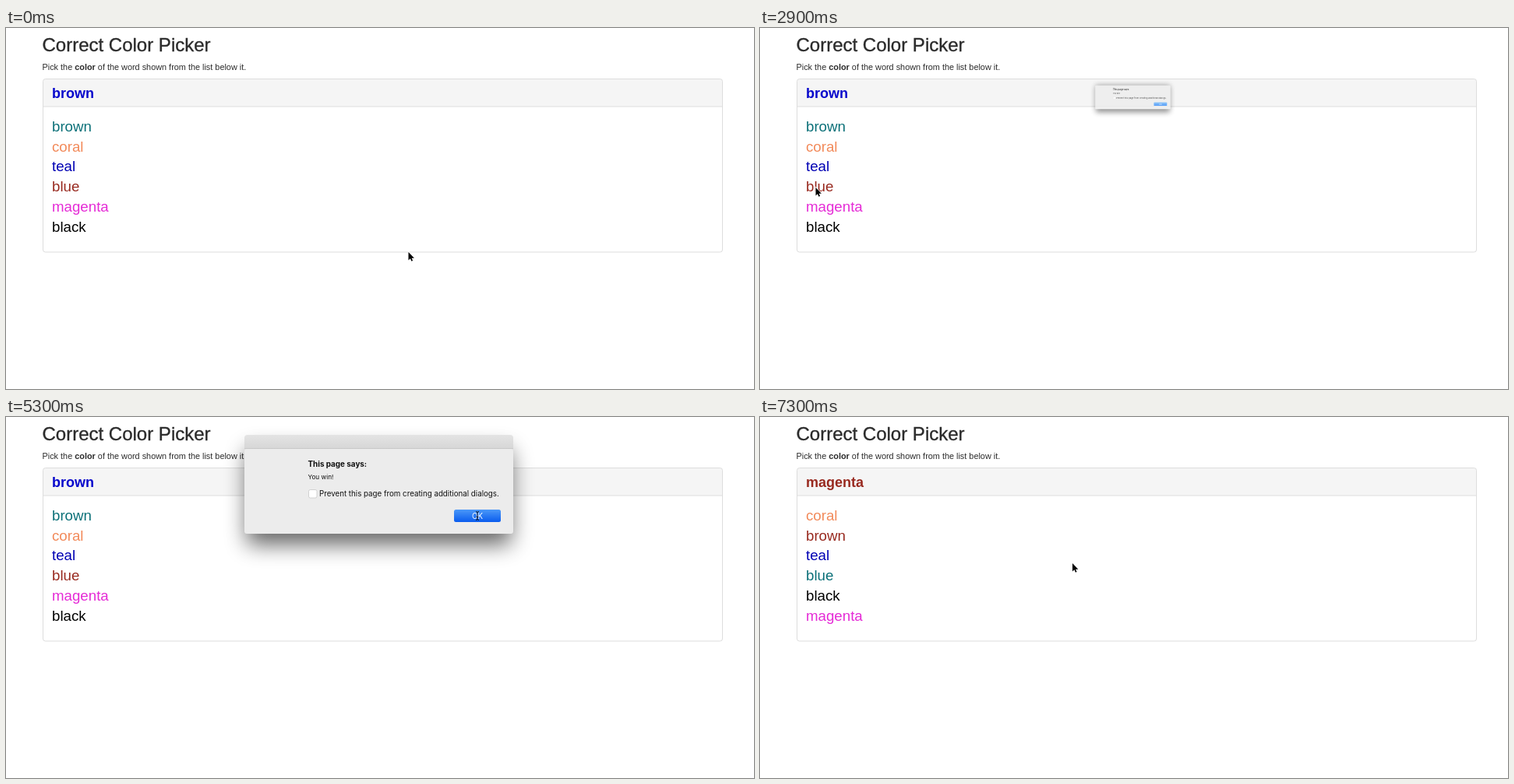
Recreate the animation shown at these times as an HTML page. Size 960 px wide and 464 px high, loop 7400 ms.

```html
<!DOCTYPE html>
<html lang="en">
<head>
<meta charset="utf-8">
<title>Correct Color Picker</title>
<style>
  html, body { margin: 0; width: 100%; height: 100%; overflow: hidden; background: #fff; }
  svg { display: block; width: 960px; height: 464px; font-family: "Liberation Sans", Arial, sans-serif; }
  .title { font-size: 24px; fill: #2b2b2b; stroke: #2b2b2b; stroke-width: .35px; }
  .hint { font-size: 10.88px; fill: #2b2b2b; }
  #word { font-size: 18px; font-weight: bold; }
  #list { font-size: 18.7px; }
  #dialog { font-family: Inter, sans-serif; font-size: 9.74px; fill: #111; }
</style>
</head>
<body>
<svg viewBox="0 0 960 464">
  <defs>
    <linearGradient id="bar" x2="0" y2="1"><stop stop-color="#e4e4e4"/><stop offset="1" stop-color="#d6d6d6"/></linearGradient>
    <linearGradient id="ready" x2="0" y2="1"><stop stop-color="#6ab4fa"/><stop offset="1" stop-color="#147afb"/></linearGradient>
    <linearGradient id="pressed" x2="0" y2="1"><stop stop-color="#4a98f8"/><stop offset="1" stop-color="#0a5cee"/></linearGradient>
    <filter id="blur" x="-30%" y="-60%" width="160%" height="220%"><feGaussianBlur stdDeviation="14"/></filter>
  </defs>

  <text class="title" x="46.5" y="30">Correct Color Picker</text>
  <text class="hint" x="46.5" y="53.5">Pick the <tspan font-weight="bold">color</tspan> of the word shown from the list below it.</text>

  <path d="M47.5 101V68.500q0-3 3-3H916.500q3 0 3 3V101Z" fill="#f5f5f5"/>
  <path d="M47.500 101H919.500" stroke="#ddd"/>
  <rect x="47.500" y="65.500" width="872" height="222.500" rx="3" fill="none" stroke="#ddd"/>
  <text id="word" x="59" y="90"></text>
  <g id="list"></g>

  <g id="dialog">
    <rect x="309" y="42" width="339" height="122" rx="4" fill="#000" opacity=".6" filter="url(#blur)"/>
    <rect x="306" y="41" width="345" height="109" rx="3" fill="#ececec"/>
    <path id="titlebar" d="M306 41V27q0-4 4-4H647q4 0 4 4V41Z" fill="url(#bar)"/>
    <path d="M306 40.500H651" stroke="#c6c6c6" stroke-width=".8"/>
    <text x="387.500" y="63.500" font-size="9.9" font-weight="bold">This page says:</text>
    <text x="387.500" y="80" font-size="8.2">You win!</text>
    <rect x="388.500" y="93.500" width="10.500" height="10.500" rx="2" fill="#fff" stroke="#c8c8c8" stroke-width=".8"/>
    <text x="402" y="102.300">Prevent this page from creating additional dialogs.</text>
    <rect id="button" x="575" y="119" width="60" height="16" rx="2.500"/>
    <text x="605" y="130.700" text-anchor="middle" fill="#fff">OK</text>
  </g>

  <g id="cursor">
    <path id="arrow" d="M0 0V10.500L2.400 8.300 3.900 11.800 5.600 11.100 4.100 7.700H7.400Z" stroke="#fff" stroke-width="1.200" paint-order="stroke"/>
    <path id="beam" d="M-2-5.500Q0-5.500 0-4Q0-5.500 2-5.500M0-4V4M-2 5.500Q0 5.500 0 4Q0 5.500 2 5.500M-1.300 1.500H1.300" fill="none" stroke="#111" stroke-width=".9"/>
  </g>
</svg>
<script>
const LOOP = 7400, STEP = 100;
const PRESS = 5200, CLOSE = 5500;
const $ = id => document.getElementById(id);

const ink = {
  blue: "#0808cc", navy: "#0000b4", teal: "#0b7078", coral: "#f28a5a",
  brown: "#98291f", magenta: "#e52bd6", black: "#000"
};
const rounds = [
  { word: ["brown", "blue"],
    list: [["brown", "teal"], ["coral", "coral"], ["teal", "navy"],
           ["blue", "brown"], ["magenta", "magenta"], ["black", "black"]] },
  { word: ["magenta", "brown"],
    list: [["coral", "coral"], ["brown", "brown"], ["teal", "navy"],
           ["blue", "teal"], ["black", "black"], ["magenta", "magenta"]] }
];

// Each move eases to a resting point; bend bows the path downwards.
const start = { x: 516.5, y: 288 };
const moves = [
  { from: 200, to: 1200, x: 78, y: 190, bend: 0 },
  { from: 1700, to: 2300, x: 71.5, y: 205, bend: 0 },
  { from: 3500, to: 4980, x: 605, y: 127, bend: 56.5 },
  { from: 6380, to: 7300, x: 401, y: 188, bend: 0 }
];

const clamp = v => Math.min(1, Math.max(0, v));
const ease = u => u * u * (3 - 2 * u);

function cursorAt(t) {
  let { x, y } = start;
  for (const m of moves) {
    const s = ease(clamp((t - m.from) / (m.to - m.from)));
    x += (m.x - x) * s;
    y += (m.y - y) * s + 4 * m.bend * s * (1 - s);
  }
  return { x, y };
}

function setText(node, [text, color]) {
  node.textContent = text;
  node.setAttribute("fill", ink[color]);
}

const rows = rounds[0].list.map((_, i) => {
  const row = document.createElementNS("http://www.w3.org/2000/svg", "text");
  row.setAttribute("x", 59);
  row.setAttribute("y", 132.6 + 25.9 * i);
  return $("list").appendChild(row);
});

let shownRound;
function showRound(round) {
  if (round === shownRound) return;
  shownRound = round;
  setText($("word"), round.word);
  rows.forEach((row, i) => setText(row, round.list[i]));
}

function showDialog(t) {
  const scale = t < 2900 ? 0 : Math.min(1, 0.28 + (t - 2900) / 200 * 0.72);
  const fade = t < CLOSE ? 1 : clamp(1 - (t - CLOSE + 50) / 100);
  const visible = scale > 0 && fade > 0;
  $("dialog").style.display = visible ? "" : "none";
  if (!visible) return;
  $("dialog").setAttribute("transform",
    `translate(478.5 86.5) scale(${scale}) translate(-478.5 -86.5)`);
  $("dialog").setAttribute("opacity", fade * (0.65 + 0.35 * ease(scale)));
  $("titlebar").style.display = scale < 1 ? "none" : "";
  $("button").setAttribute("fill", t < PRESS ? "url(#ready)" : "url(#pressed)");
}

function draw(now) {
  const t = Math.floor(now % LOOP / STEP) * STEP;
  showRound(rounds[t < CLOSE ? 0 : 1]);
  showDialog(t);
  const { x, y } = cursorAt(t);
  const overButton = t >= 4800 && t < CLOSE + 100;
  $("cursor").setAttribute("transform", `translate(${x} ${y})`);
  $("arrow").style.display = overButton ? "none" : "";
  $("beam").style.display = overButton ? "" : "none";
}

function tick(now) {
  draw(now);
  requestAnimationFrame(tick);
}
draw(0);
requestAnimationFrame(tick);
</script>
</body>
</html>
```
